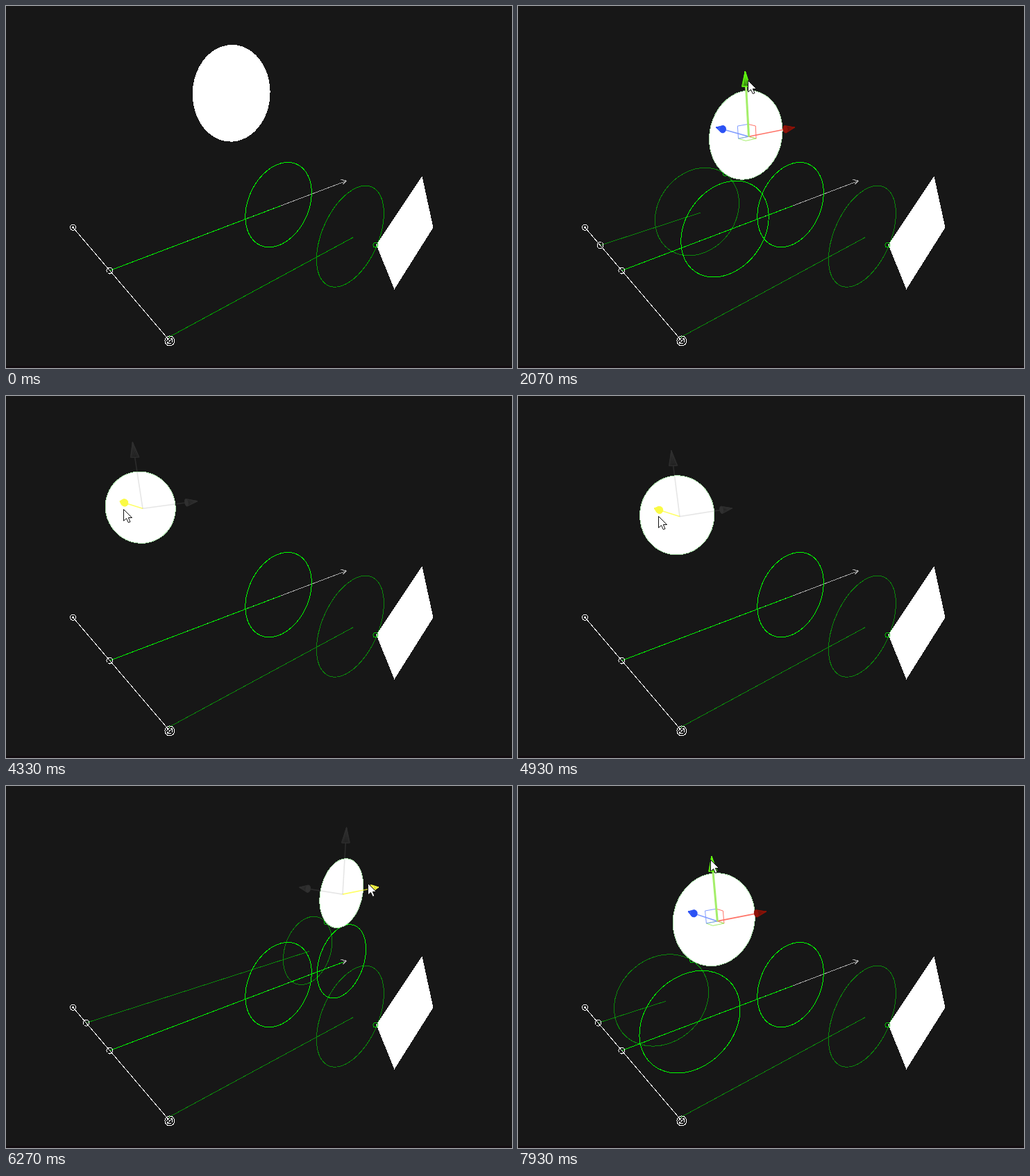
An HTML page that plays this animation: 729 by 522 pixels, repeating every 8000 ms.

```html
<!DOCTYPE html>
<html lang="en">
<head>
<meta charset="utf-8">
<title>Circle cast</title>
<style>
  html, body { margin: 0; width: 100%; height: 100%; overflow: hidden; background: #171717; }
  svg { display: block; width: 729px; height: 522px; fill: none; }
</style>
</head>
<body>
<svg id="stage" viewBox="-.5 -.5 729 522"></svg>
<script>
const stage = document.getElementById('stage');
const LOOP = 8000, RADIUS = 0.1685, REACH = 0.629, FAR = 1.023, EDGE = 0.355;
const GIZMO = 0.169;
const GREEN = '#00ff00';

// Perspective camera given by the vanishing points of the three axes.
const ORIGIN = [149, 381];
const AXES = {
  x: { vanish: [1022, 50], weight: 0.6263, line: '#ff7468', cone: '#8f1208', hot: '#b01408' },
  y: { vanish: [405, 1523], weight: -0.3898, line: '#a4ee6a', cone: '#5bea1c', hot: '#62ff10' },
  z: { vanish: [-125, 59.5], weight: 0.6756, line: '#7f9cff', cone: '#2b52f4', hot: '#3a66ff' }
};

function project(p) {
  let sx = ORIGIN[0], sy = ORIGIN[1], w = 1;
  for (const name in AXES) {
    const { vanish, weight } = AXES[name];
    const k = weight * p[name];
    sx += k * vanish[0];
    sy += k * vanish[1];
    w += k;
  }
  return [sx / w, sy / w];
}
const depth = p => 1 + Object.keys(AXES).reduce((sum, a) => sum + AXES[a].weight * p[a], 0);
const shift = (p, axis, d) => ({ ...p, [axis]: p[axis] + d });

const smooth = u => u * u * (3 - 2 * u);
const clamp = u => Math.min(1, Math.max(0, u));
const mix = (a, b, u) => a + (b - a) * u;

// Eased value between [time, value] keys.
function track(keys, t) {
  let value = keys[0][1];
  for (let i = 1; i < keys.length; i++) {
    const [t0, a] = keys[i - 1], [t1, b] = keys[i];
    if (t >= t0) value = mix(a, b, smooth(clamp((t - t0) / (t1 - t0))));
  }
  return value;
}

const X_KEYS = [[2620, 0.5745], [3080, 0.473], [5790, 0.473], [6500, 1.477], [6560, 1.477], [7206, 0.4505]];
const Y_KEYS = [[1480, 0.397], [2010, 0.2446]];
const Z_KEYS = [[3900, 0.189], [4610, 1.141], [4640, 1.141], [5130, 0.223], [5200, 0.223], [5330, 0.21]];
const DRAGS = [[1450, 2020, 'y'], [2600, 3090, 'x'], [3700, 5350, 'z'], [5740, 7220, 'x']];
const STRONG = [[0, 400], [600, 1000], [2800, 3800]];

// Pointer keys: time, handle it follows (or none), position or offset.
const POINTER = [
  [870, '', 560, 150], [1130, '', 345, 110], [1420, 'y', 3, -5], [2070, 'y', 3, -5],
  [2540, 'x', 0, 3], [3130, 'x', 0, 3], [3400, '', 257, 195], [3600, 'z', 0, 10],
  [5350, 'z', 0, 10], [5640, 'x', -5, 3], [5800, 'x', -5, 3], [6300, 'x', -6, -7],
  [7220, 'x', -6, -7], [7400, 'x', -5, 5], [7580, 'x', -5, 5], [7930, '', 277, 106]
];

const path = points => 'M' + points.map(p => p[0].toFixed(1) + ' ' + p[1].toFixed(1)).join('L');
const line = (a, b, color, width = 1) =>
  `<path d="${path([a, b])}" stroke="${color}" stroke-width="${width}"/>`;
const ring = (p, r, color) =>
  `<circle cx="${p[0].toFixed(1)}" cy="${p[1].toFixed(1)}" r="${r}" stroke="${color}"/>`;

function loopPoints(center, radius, u, v, count) {
  return Array.from({ length: count }, (_, i) => {
    const a = i / count * Math.PI * 2;
    return project(shift(shift(center, u, radius * Math.cos(a)), v, radius * Math.sin(a)));
  });
}
const disc = (center, color, fill = 'none') =>
  `<path d="${path(loopPoints(center, RADIUS, 'x', 'y', 48))}Z" stroke="${color}" fill="${fill}"/>`;

const onRay = (x, z = 0, y = 0) => ({ x, y, z });

function drawCast(hitX, z, y, color) {
  const end = onRay(hitX, z, y);
  return line(project(onRay(0, z, y)), project(end), color) + disc(end, color);
}

function drawScene(t, ball, selected) {
  const dim = STRONG.some(([a, b]) => t >= a && t < b) ? '#00a000' : '#0b870b';
  const gap = 4 * RADIUS * RADIUS - ball.y * ball.y;
  const hitX = ball.x - Math.sqrt(Math.max(0, gap));
  const hit = gap > 0 && hitX < FAR && Math.abs(ball.z) < EDGE;
  const tip = project(onRay(FAR));
  const start = project(onRay(0));
  const left = project(onRay(0, EDGE)), right = project(onRay(0, -EDGE));

  let out = '<path d="M-1 518.5H730V523H-1Z" fill="#130d11"/><g shape-rendering="crispEdges">';
  out += line(start, tip, '#a8a8a8');
  out += `<path d="M${tip[0] - 8} ${tip[1] - 2}L${tip}L${tip[0] - 5} ${tip[1] + 5}" stroke="#a8a8a8"/>`;
  out += drawCast(0.622, -0.348, 0.004, dim);
  out += '<path d="M599 245L615 319L559 408L533 344Z" fill="#fff"/>';
  out += ring([532, 344], 3.5, '#00c800');
  if (hit) {
    out += drawCast(hitX, ball.z, 0, dim);
    out += disc(onRay(hitX), GREEN);
    out += ring(project(onRay((hitX + ball.x) / 2, ball.z, ball.y / 2)), 3, '#00c800');
  }
  out += line(start, project(onRay(hit ? Math.max(REACH, hitX) : REACH)), GREEN);
  out += disc(onRay(REACH), GREEN);
  out += line(left, right, '#fff');
  out += ring(left, 4, '#fff') + ring(left, 1, '#fff') + ring(start, 4.5, '#fff');
  out += ring(right, 7, '#fff') + ring(right, 4, '#fff');
  out += line([right[0] - 4, right[1] + 4], [right[0] + 4, right[1] - 4], '#fff');
  if (hit) out += ring(project(onRay(0, ball.z)), 4.5, '#fff');
  return out + disc(ball, selected ? '#a9dca9' : '#fff', '#fff') + '</g>';
}

function drawPlanes(ball, s) {
  const corners = { x: -s, y: s, z: -s };
  return [['y', 'z', '#ff7468'], ['x', 'z', '#a4ee6a'], ['x', 'y', '#7f9cff']].map(([u, v, color]) => {
    const a = shift(ball, u, corners[u]), b = shift(ball, v, corners[v]);
    const square = [ball, a, shift(a, v, corners[v]), b].map(project);
    return `<path d="${path(square)}Z" stroke="${color}"/>`;
  }).join('');
}

function drawArrow(ball, name, size, state) {
  const axis = AXES[name];
  const [u, v] = Object.keys(AXES).filter(a => a !== name);
  const base = shift(ball, name, size * 0.78);
  const tip = project(shift(ball, name, size));
  const rim = loopPoints(base, size * 0.064, u, v, 16);
  const sides = rim.map((p, i) => path([tip, p, rim[(i + 1) % rim.length]]) + 'Z').join('');
  const color = { idle: axis.line, hover: axis.line, drag: 'rgba(255,255,40,.7)', off: 'rgba(128,128,128,.2)' }[state];
  const fill = { idle: axis.cone, hover: axis.hot, drag: '#fafa46', off: '#303030' }[state];
  return line(project(ball), project(base), color, state === 'hover' ? 3 : 1.6) +
    `<path d="${sides}" fill="${fill}" stroke="${fill}" stroke-width=".4"/>` +
    `<path d="${path(rim)}Z" fill="${fill}"/>`;
}

function pointerAt(t, handle) {
  const place = ([, axis, x, y]) => {
    if (!axis) return [x, y];
    const p = handle(axis);
    return [p[0] + x, p[1] + y];
  };
  const i = POINTER.findIndex(key => key[0] > t);
  if (i < 0) return place(POINTER[POINTER.length - 1]);
  const from = POINTER[i - 1], to = POINTER[i];
  const u = smooth((t - from[0]) / (to[0] - from[0]));
  const a = place(from), b = place(to);
  return [mix(a[0], b[0], u), mix(a[1], b[1], u)];
}

function drawTools(t, ball, selected) {
  const size = GIZMO * depth(ball);
  const handle = axis => project(shift(ball, axis, size * 0.82));
  const pointer = pointerAt(t, handle);
  const drag = DRAGS.find(([a, b]) => t >= a && t < b);
  let out = '';
  if (selected) {
    if (!drag) out += drawPlanes(ball, size * 0.2);
    for (const name of ['z', 'x', 'y']) {
      const [hx, hy] = handle(name);
      const near = Math.hypot(hx - pointer[0], hy - pointer[1]) < 13;
      const state = drag ? (drag[2] === name ? 'drag' : 'off') : near ? 'hover' : 'idle';
      out += drawArrow(ball, name, size, state);
    }
  }
  return out + `<path transform="translate(${pointer.map(Math.round)})" fill="#fff" stroke="#111"
    d="M0 0V16.5L4 13L6.8 19L9.5 18L6.8 12H12Z"/>`;
}

function frame() {
  const t = performance.now() % LOOP;
  const ball = { x: track(X_KEYS, t), y: track(Y_KEYS, t), z: track(Z_KEYS, t) };
  const selected = t >= 1130;
  stage.innerHTML = drawScene(t, ball, selected) + (t >= 870 ? drawTools(t, ball, selected) : '');
  requestAnimationFrame(frame);
}
frame();
</script>
</body>
</html>
```
